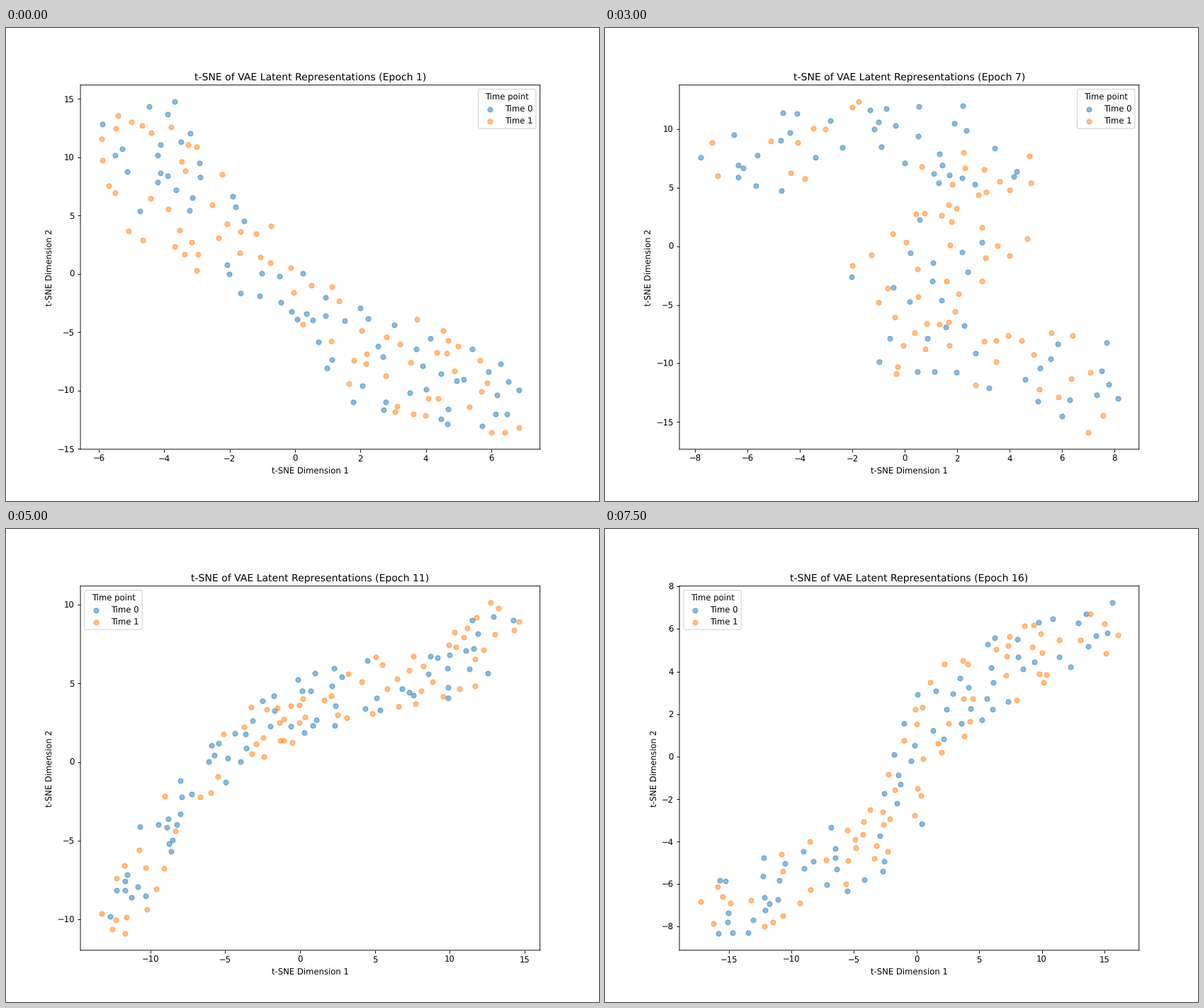
Write a matplotlib script that moves like this. It is 837x669 px and loops after 8 s.

```python
import matplotlib.pyplot as plt
import numpy as np
from matplotlib.animation import FuncAnimation

W, H, DPI = 837, 669, 83.7
GROUP = 70  # points per time point
MARGIN = 0.05

# Soft, unsnapped edges and text
plt.rcParams.update({"text.hinting": "none", "path.snap": False})

# Each cloud is a ribbon: x, y and half-width at a few knots
SLOPE = (9, 76, 9), (14, 59, 13), (36, 41, 8), (48, 32, 7), (65, 19, 12), (95, 9, 7)
FORK = ((77, 72, 7), (55, 68, 11), (38, 51, 14), (11, 27, 7),
        (28, 24, 8), (57, 22, 7), (79, 14, 10), (93, 10, 9))
HOOK = ((3, 64, 5), (18, 68, 9), (38, 75, 5), (60, 69, 10), (64, 58, 11),
        (41, 32, 13), (60, 22, 6), (80, 20, 10), (88, 9, 9))
WEDGE = (37, 78, 38), (32, 58, 27), (43, 43, 21), (44, 26, 16), (58, 10, 10), (98, 9, 4)
RISE = (3, 3, 4), (10, 12, 6), (16, 31, 4), (28, 40, 5), (47, 54, 7), (86, 64, 7), (98, 77, 4)
ARCH = (2, 60, 7), (21, 71, 9), (29, 62, 5), (43, 54, 10), (72, 50, 6), (91, 43, 8), (98, 2, 4)
STEP = (2, 9, 6), (10, 12, 8), (45, 27, 7), (48, 43, 5), (60, 56, 9), (77, 66, 7), (98, 73, 5)

# One per epoch: ribbon, x limits, y limits
STAGES = [
    (SLOPE, (-6.56, 7.49), (-15.05, 16.2)),
    (SLOPE, (-7.5, 7.6), (-8.6, 8.5)),
    (SLOPE, (-9.5, 9.5), (-8.7, 8.6)),
    (FORK, (-9, 9.3), (-11, 11)),
    (FORK, (-7.79, 7.61), (-14.07, 16.56)),
    (HOOK, (-8.5, 8.8), (-11, 10.6)),
    (HOOK, (-8.59, 8.93), (-17.32, 13.75)),
    (RISE, (-7, 7.5), (-15.8, 14.6)),
    (WEDGE, (-4.235, 4.914), (-18.03, 16.7)),
    (ARCH, (-13, 14), (-8.5, 8.2)),
    (RISE, (-14.68, 16.04), (-11.98, 11.2)),
    (RISE, (-16, 17), (-11.6, 11.9)),
    (STEP, (-16, 16.5), (-7.6, 8.1)),
    (ARCH, (-17.85, 17.06), (-6.47, 4.43)),
    (STEP, (-18, 17.5), (-8.4, 8.3)),
    (STEP, (-18.93, 17.76), (-9.11, 8.02)),
]


def ribbon_points(knots, n, rng):
    """Random points spread evenly over a ribbon."""
    x, y, r = np.array(knots, float).T
    arc = np.r_[0, np.cumsum(np.hypot(np.diff(x), np.diff(y)))]
    s = np.linspace(0, arc[-1], 400)
    x, y, r = (np.interp(s, arc, a) for a in (x, y, r))
    angle = np.arctan2(np.gradient(y), np.gradient(x))

    k = rng.choice(len(s), 4000, p=r / r.sum())
    off = r[k] * rng.uniform(-1, 1, len(k))
    pool = np.c_[x[k] - off * np.sin(angle[k]), y[k] + off * np.cos(angle[k])]

    # Keep the roomiest of a few tries each time
    pts = [pool[0]]
    while len(pts) < n:
        tries = pool[rng.integers(len(pool), size=3)]
        gaps = np.linalg.norm(tries[:, None] - np.array(pts), axis=2).min(1)
        pts.append(tries[gaps.argmax()])
    return rng.permutation(np.array(pts))


def build(epoch):
    knots, xlim, ylim = STAGES[epoch]
    pts = ribbon_points(knots, 2 * GROUP, np.random.default_rng(epoch))
    unit = (pts - pts.min(0)) / np.ptp(pts, axis=0)
    low, high = np.transpose([xlim, ylim])
    return low + (high - low) * (unit + MARGIN) / (1 + 2 * MARGIN)


clouds = [build(epoch) for epoch in range(len(STAGES))]

fig, ax = plt.subplots(figsize=((W + 0.01) / DPI, (H + 0.01) / DPI), dpi=DPI)
fig.subplots_adjust(left=0.1255, right=0.9005, bottom=0.1094, top=0.8794)


def draw(epoch):
    ax.clear()
    for t in range(2):
        x, y = clouds[epoch][t * GROUP:(t + 1) * GROUP].T
        ax.scatter(x, y, color=f"C{t}", alpha=0.5, label=f"Time {t}")
    _, xlim, ylim = STAGES[epoch]
    ax.set(xlim=xlim, ylim=ylim,
           xlabel="t-SNE Dimension 1", ylabel="t-SNE Dimension 2",
           title=f"t-SNE of VAE Latent Representations (Epoch {epoch + 1})")
    ax.legend(title="Time point", loc="best")


anim = FuncAnimation(fig, draw, frames=len(STAGES), interval=500,
                     init_func=lambda: None, repeat=True)
plt.show()
```
